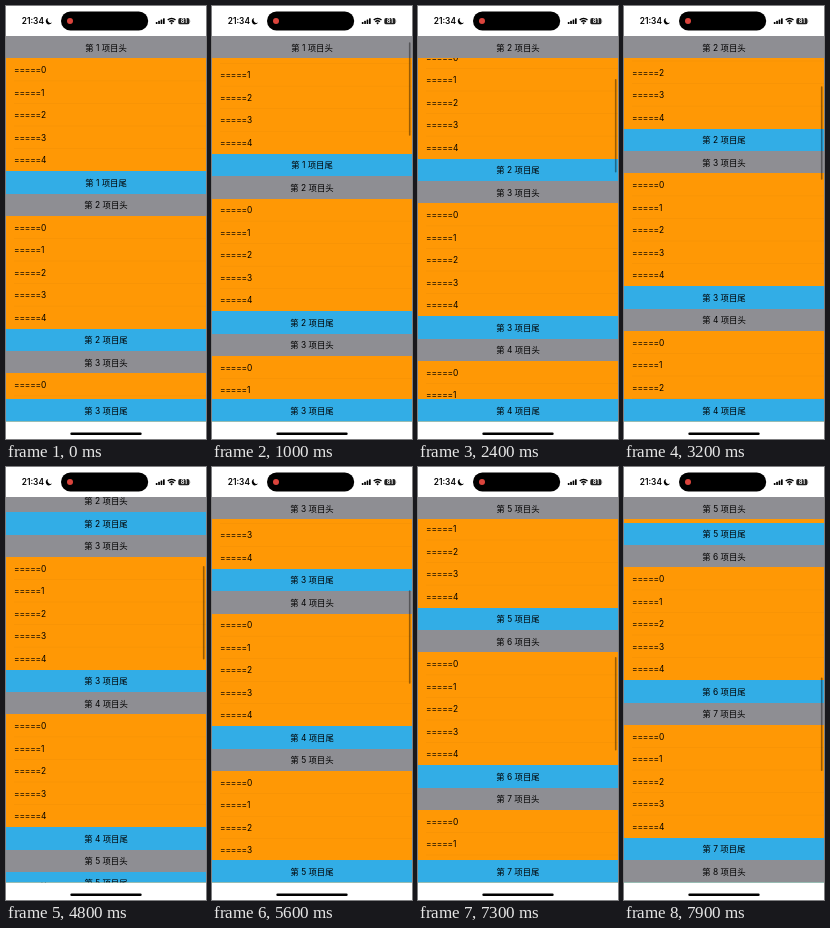
Recreate the animation shown at these times as an HTML page. Size 200 by 433 pixels, loop 8 s.

```html
<!DOCTYPE html>
<html lang="zh">
<head>
<meta charset="utf-8">
<style>
  html, body { margin: 0; width: 100%; height: 100%; overflow: hidden; background: #fff; }
  svg { display: block; width: 100%; height: 100%; }
  text { font-family: Inter, "Noto Sans CJK SC", "Noto Sans CJK", sans-serif; font-size: 8.4px; fill: #000; }
  .title { text-anchor: middle; }
  .row { letter-spacing: -0.15px; }
  .fill { shape-rendering: crispEdges; }
  .clock { font-size: 8.3px; font-weight: 600; }
  .charge { font-size: 5.8px; font-weight: 700; fill: #fff; text-anchor: middle; }
</style>
</head>
<body>
<svg viewBox="0 0 200 433">
  <defs>
    <clipPath id="view"><rect y="30" width="200" height="385.6"/></clipPath>
  </defs>
  <rect width="200" height="433" fill="#fff"/>
  <g clip-path="url(#view)">
    <rect y="30" width="200" height="386" fill="#ff9805"/>
    <g id="rows"></g>
    <g id="bands"></g>
  </g>
  <rect id="indicator" x="196.9" width="1.6" height="93.5" rx="0.8" fill="#000"/>

  <text class="clock" x="15.8" y="18">21:34</text>
  <path d="M42.2 11.9A3.3 3.3 0 1 0 46 16.6A3.1 3.1 0 0 1 42.2 11.9Z"/>
  <rect x="55" y="5.6" width="87.2" height="18.9" rx="9.45"/>
  <circle cx="64" cy="15" r="3" fill="#db443c"/>
  <g id="signal"></g>
  <g fill="none" stroke="#000" stroke-width="1.4">
    <path d="M161.7 14.1A5.6 5.6 0 0 1 169.5 14.1"/>
    <path d="M163.3 15.8A3.3 3.3 0 0 1 167.9 15.8"/>
  </g>
  <path d="M164.3 17A1.8 1.8 0 0 1 166.9 17L165.6 18.4Z"/>
  <rect x="172.3" y="12" width="11.2" height="6.3" rx="1.9" fill="#222"/>
  <path d="M184.1 14.2Q185 15.1 184.1 16.1Z" fill="#999"/>
  <text class="charge" x="177.8" y="17.3">81</text>
  <rect x="64.3" y="426.4" width="71.4" height="2.5" rx="1.25"/>
</svg>
<script>
const LOOP = 8000, STEP = 100;
const TOP = 30, BOTTOM = 415.6, BAND = 22.4, CELL = 22.54, ROWS = 5, SECTIONS = 10;
const SECTION = CELL * ROWS + BAND * 2;
const $ = id => document.getElementById(id);

// Scroll offset keys: [ms, px]
const keys = [
  [0, 0], [700, 0], [1200, 37], [1600, 85.5], [1700, 99.4], [2000, 136], [2400, 170],
  [2800, 189], [3200, 200], [3600, 204], [4300, 204], [4800, 277.5],
  [6300, 472], [7300, 654.5], [7900, 739.5], [8000, 752]
];

function add(parent, tag, attrs, content = "") {
  const node = document.createElementNS("http://www.w3.org/2000/svg", tag);
  for (const name in attrs) node.setAttribute(name, attrs[name]);
  node.textContent = content;
  return parent.appendChild(node);
}

function band(label, color) {
  const group = add($("bands"), "g", {});
  add(group, "rect", { class: "fill", width: 200, height: BAND, fill: color });
  add(group, "text", { class: "title", x: 100, y: 14.5 }, label);
  return group;
}

for (let i = 0; i < 4; i++) {
  const height = 1.9 + i * 1.25;
  add($("signal"), "rect", { x: 149.8 + i * 2.4, y: 17.9 - height, width: 1.7, height, rx: 0.5 });
}

const sections = [];
for (let s = 0; s < SECTIONS; s++) {
  for (let r = 0; r < ROWS; r++) {
    const y = s * SECTION + BAND + r * CELL;
    add($("rows"), "text", { class: "row", x: 8, y: y + 14.6 }, "=====" + r);
    if (r) add($("rows"), "rect", { x: 8, y: y - 0.25, width: 192, height: 0.5, "fill-opacity": 0.05 });
  }
  sections.push({
    head: band(`第 ${s + 1} 项目头`, "#8e8e93"),
    foot: band(`第 ${s + 1} 项目尾`, "#32ade6")
  });
}

const slope = i => (keys[i + 1][1] - keys[i][1]) / (keys[i + 1][0] - keys[i][0]);

function tangent(i) {
  if (i === 0) return slope(0);
  if (i === keys.length - 1) return slope(i - 1);
  const a = slope(i - 1), b = slope(i);
  return a * b > 0 ? 2 * a * b / (a + b) : 0;
}

// Monotone cubic interpolation
function scrollAt(t) {
  let i = 0;
  while (i < keys.length - 2 && t >= keys[i + 1][0]) i++;
  const [t0, y0] = keys[i], [t1, y1] = keys[i + 1];
  const d = t1 - t0, u = (t - t0) / d, v = 1 - u;
  return y0 * (1 + 2 * u) * v * v + y1 * u * u * (3 - 2 * u)
    + d * u * v * (v * tangent(i) - u * tangent(i + 1));
}

function indicatorAlpha(t) {
  if (t < 800 || (t >= 3800 && t < 4400)) return 0;
  return t > 3400 && t < 3800 ? (3800 - t) / 400 : 1;
}

const moveTo = (node, y) => node.setAttribute("transform", `translate(0 ${y})`);

function draw(t) {
  const offset = scrollAt(t);
  moveTo($("rows"), TOP - offset);
  sections.forEach(({ head, foot }, s) => {
    const headY = TOP + s * SECTION - offset;
    const footY = headY + SECTION - BAND;
    moveTo(head, Math.max(headY, Math.min(TOP, footY - BAND)));
    moveTo(foot, Math.min(footY, Math.max(BOTTOM - BAND, headY + BAND)));
  });
  $("indicator").setAttribute("y", 32 + offset * 0.2415);
  $("indicator").setAttribute("fill-opacity", 0.4 * indicatorAlpha(t));
}

const start = performance.now();
function frame() {
  const t = (performance.now() - start) % LOOP;
  draw(Math.floor(t / STEP) * STEP);
  requestAnimationFrame(frame);
}
frame();
</script>
</body>
</html>
```
